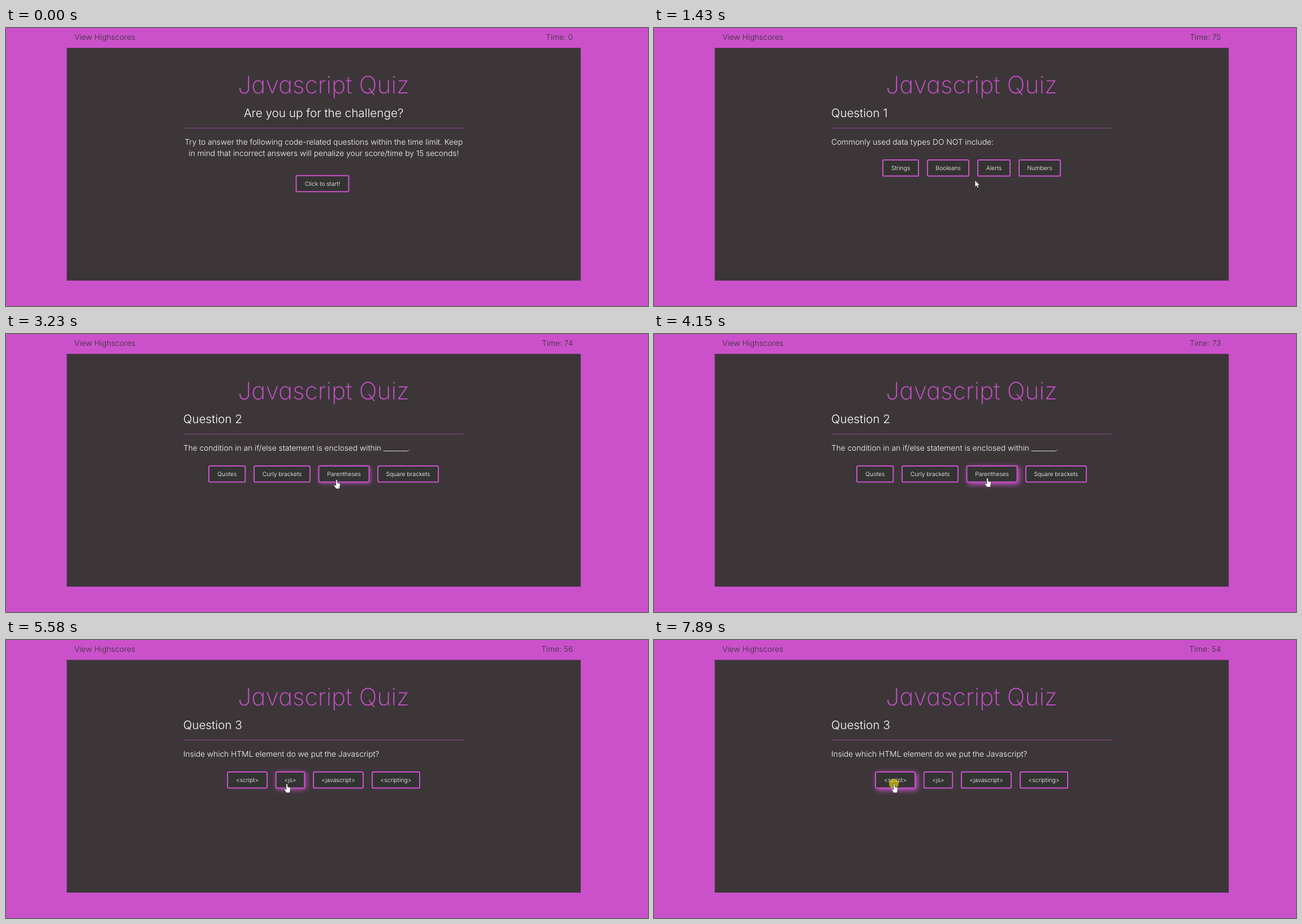
An HTML page that plays this animation: 1136 by 493 pixels, repeating every 7990 ms.

```html
<!DOCTYPE html>
<html lang="en">
<head>
<meta charset="utf-8">
<title>Javascript Quiz</title>
<style>
  html, body { margin: 0; height: 100%; overflow: hidden; background: #cb51cb; }
  svg { display: block; width: 1136px; height: 493px; }
  text {
    font: 300 13.78px Inter, "Open Sans", sans-serif;
    font-optical-sizing: none;
    text-rendering: geometricPrecision;
    fill: #fff;
  }
  .nav { fill: #333330; }
  .title { font-size: 42.5px; font-weight: 200; font-feature-settings: "cv11"; fill: #cb51cb; }
  .head { font-size: 20.7px; }
  .label { font-size: 10.35px; }
  .mid { text-anchor: middle; }
  .end { text-anchor: end; }
  .button { fill: #333432; stroke: #cb51cb; stroke-width: 2; }
  .pointer { fill: #fff; stroke: #222; stroke-width: .7; stroke-linejoin: round; }
</style>
</head>
<body>
<svg id="stage" viewBox="0 0 1136 493"></svg>
<script>
const LOOP = 7990, RAMP = 200;
const stage = document.getElementById('stage');

// Each button: label, left, right
const scenes = [
  { from: 0, y: 260.7, buttons: [['Click to start!', 512.5, 607.5]] },
  { from: 1360, y: 233, head: 'Question 1', ask: 'Commonly used data types DO NOT include:',
    buttons: [['Strings', 404, 469], ['Booleans', 483, 558], ['Alerts', 572, 631], ['Numbers', 645, 720]] },
  { from: 3110, y: 233, head: 'Question 2', ask: 'The condition in an if/else statement is enclosed within _______.',
    buttons: [['Quotes', 358, 424.3], ['Curly brackets', 438, 539], ['Parentheses', 552.5, 643.5], ['Square brackets', 657, 766]] },
  { from: 5430, y: 233, head: 'Question 3', ask: 'Inside which HTML element do we put the Javascript?',
    buttons: [['&lt;script&gt;', 391, 463], ['&lt;js&gt;', 476.7, 529.2], ['&lt;javascript&gt;', 543, 633], ['&lt;scripting&gt;', 647, 733]] }
];
// Time, seconds shown
const clock = [[0, 0], [1360, 75], [2370, 74], [3390, 73], [4380, 72], [5340, 71], [5430, 56], [6420, 55], [7350, 54]];
// Time, x, y of the pointer
const path = [[500, 919, 467], [1100, 568, 270], [2680, 568, 270], [2860, 584, 259], [3180, 584, 259], [3380, 590, 255.5],
  [4450, 590, 255.5], [4700, 497, 255], [7510, 497, 255], [7720, 425, 255], [LOOP, 425, 255]];
// Scene, button, hover start, hover end
const hovers = [[0, 0, 980, 1360], [1, 2, 2780, 3110], [2, 2, 3110, 4556], [2, 1, 4582, 5430], [3, 1, 5430, 7586], [3, 0, 7611, LOOP]];
const clicks = [[1280, 1400], [3040, 3180], [5340, 5500], [7890, LOOP]];

const clamp = v => Math.min(1, Math.max(0, v));
const smooth = v => v * v * (3 - 2 * v);
const within = (t, a, b) => t >= a && t < b;
const text = (x, y, cls, s) => `<text x="${x}" y="${y}" class="${cls}">${s}</text>`;

function glow(t, scene, button) {
  let level = 0;
  for (const [s, b, from, to] of hovers) {
    if (s !== scene || b !== button || t < from) continue;
    level = Math.max(level, clamp((Math.min(t, to) - from) / RAMP) - clamp((t - to) / RAMP));
  }
  return smooth(clamp(level));
}

function drawButton([label, left, right], y, level) {
  const shadow = level ? `style="filter:drop-shadow(${3.5 * level}px ${3.5 * level}px ${5 * level}px rgb(203 81 203 / ${level}))"` : '';
  return `<rect class="button" x="${left + 1}" y="${y + 1}" width="${right - left - 2}" height="28.6" rx="2.2" ${shadow}/>` +
    text((left + right) / 2, y + 19, 'label mid', label);
}

function drawPointer(t) {
  if (t < path[0][0]) return '';
  const i = path.findIndex(k => k[0] > t);
  const [t0, x0, y0] = path[i - 1], [t1, x1, y1] = path[i];
  const k = smooth((t - t0) / (t1 - t0));
  const hand = hovers.some(h => within(t, h[2], h[3]));
  const shape = hand
    ? 'M-1.3 1.2a1.3 1.3 0 0 1 2.6 0V5.4L5 6.3q1.7.4 1.5 2.2L5.8 13 4.8 16H-.8L-4.6 10.8q-.8-1.5.7-1.9L-1.3 10.6Z'
    : 'M0 0V12L2.7 9.6 4.5 13.8 6.5 13 4.7 8.8H8.5Z';
  const dot = clicks.some(c => within(t, ...c)) ? '<circle cx="-.7" cy="0" r="8.5" fill="#ffeb00" opacity=".58"/>' : '';
  return `<g transform="translate(${x0 + (x1 - x0) * k} ${y0 + (y1 - y0) * k})">${dot}<path class="pointer" d="${shape}"/></g>`;
}

function draw(t) {
  const n = scenes.findLastIndex(s => t >= s.from), scene = scenes[n];
  const seconds = clock.findLast(c => t >= c[0])[1];
  const body = n
    ? text(313.5, 158.3, 'head', scene.head) + text(313.7, 206.5, '', scene.ask)
    : text(562, 158.3, 'head mid', 'Are you up for the challenge?') +
      text(562.3, 206.5, 'mid', 'Try to answer the following code-related questions within the time limit. Keep') +
      text(562.3, 227.3, 'mid', 'in mind that incorrect answers will penalize your score/time by 15 seconds!');
  stage.innerHTML =
    '<rect x="107.5" y="35.3" width="909.5" height="412.7" fill="#3c3639"/>' +
    text(121, 20.8, 'nav', 'View Highscores') + text(1003.3, 20.8, 'nav end', 'Time: ' + seconds) +
    text(562, 116, 'title mid', 'Javascript Quiz') +
    '<rect x="314" y="177" width="496" height="1" fill="#cb51cb" opacity=".6"/>' +
    body + scene.buttons.map((b, i) => drawButton(b, scene.y, glow(t, n, i))).join('') + drawPointer(t);
}

const start = performance.now();
function frame() {
  draw((performance.now() - start) % LOOP);
  requestAnimationFrame(frame);
}
frame();
</script>
</body>
</html>
```
